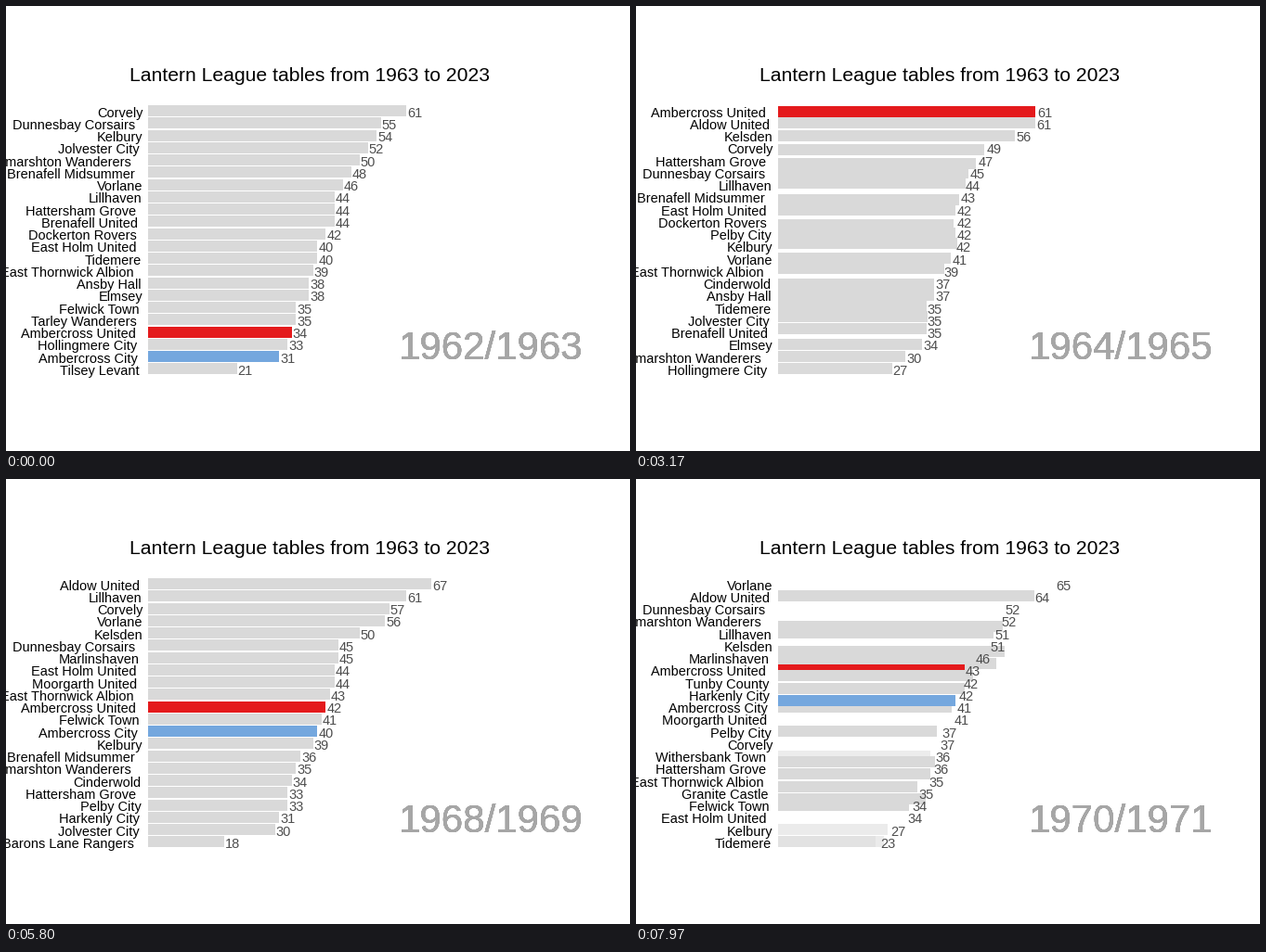
A matplotlib script that plays this animation: 672x480 px, repeating every 8000 ms.

```python
import math

import matplotlib.pyplot as plt
from matplotlib.animation import FuncAnimation
from matplotlib.patches import Rectangle

W, H, DPI = 672, 480, 96
FRAMES, FRAME_MS = 400, 20     # one loop is 8000 ms
TICK_MS = 100 / 3              # the chart itself advances 30 times a second
HOLD, MOVE = 25, 10            # ticks at rest, ticks in motion
LEFT, UNIT = 153, 4.557        # bar origin and pixels per point
TOP, PITCH, BAR_H = 113.05, 13.25, 11.92
ROWS = 22
POOL = 28

GREY, RED, BLUE = "#d9d9d9", "#e41a1c", "#74a7de"
COLORS = {"AMU": RED, "AMC": BLUE}

TEAMS = {
    "ALD": "Aldow United",
    "AMC": "Ambercross City",
    "AMU": "Ambercross United",
    "ANS": "Ansby Hall",
    "BAR": "Barons Lane Rangers",
    "BRE": "Brenafell United",
    "CIN": "Cinderwold",
    "COR": "Corvely",
    "DOC": "Dockerton Rovers",
    "DUN": "Dunnesbay Corsairs",
    "EHO": "East Holm United",
    "ELM": "Elmsey",
    "ETH": "East Thornwick Albion",
    "FEL": "Felwick Town",
    "GRA": "Granite Castle",
    "HAR": "Harkenly City",
    "HAT": "Hattersham Grove",
    "HOL": "Hollingmere City",
    "JOL": "Jolvester City",
    "KEL": "Kelbury",
    "KSD": "Kelsden",
    "LIL": "Lillhaven",
    "MAR": "Marlinshaven",
    "MID": "Brenafell Midsummer",
    "MOO": "Moorgarth United",
    "PEL": "Pelby City",
    "TAR": "Tarley Wanderers",
    "THI": "Thistlemarshton Wanderers",
    "TID": "Tidemere",
    "TIL": "Tilsey Levant",
    "TUN": "Tunby County",
    "VOR": "Vorlane",
    "WIN": "Wintersdown Town",
    "WIT": "Withersbank Town",
}

# Final tables, best team first: team code followed by points.
TABLES = {
    "1962/1963": "COR61 DUN55 KEL54 JOL52 THI50 MID48 VOR46 LIL44 HAT44 BRE44 DOC42 "
                 "EHO40 TID40 ETH39 ANS38 ELM38 FEL35 TAR35 AMU34 HOL33 AMC31 TIL21",
    "1963/1964": "LIL57 AMU53 COR52 DUN51 KSD50 MID49 DOC46 VOR45 KEL44 ETH43 JOL43 "
                 "BRE43 HAT41 EHO40 ELM39 THI39 PEL38 TID35 ANS34 HOL29 TAR28 FEL25",
    "1964/1965": "AMU61 ALD61 KSD56 COR49 HAT47 DUN45 LIL44 MID43 EHO42 DOC42 PEL42 "
                 "KEL42 VOR41 ETH39 CIN37 ANS37 TID35 JOL35 BRE35 ELM34 THI30 HOL27",
    "1965/1966": "LIL61 ALD55 KEL55 AMU51 KSD51 ETH50 JOL49 DUN44 BRE43 PEL42 COR41 "
                 "EHO39 TID37 VOR37 MOO37 ANS36 MID36 HAT36 CIN36 ELM35 WIN33 DOC20",
    "1967/1968": "AMC58 AMU56 LIL55 ALD53 COR52 KSD48 DUN47 ETH46 VOR44 MOO41 HAT39 "
                 "EHO38 JOL38 KEL38 CIN37 MAR37 THI36 PEL35 MID34 HAR33 BRE32 ELM27",
    "1968/1969": "ALD67 LIL61 COR57 VOR56 KSD50 DUN45 MAR45 EHO44 MOO44 ETH43 AMU42 "
                 "FEL41 AMC40 KEL39 MID36 THI35 CIN34 HAT33 PEL33 HAR31 JOL30 BAR18",
    "1969/1970": "COR66 ALD57 KSD55 TUN53 LIL51 HAR49 MOO47 AMU45 PEL45 AMC43 DUN43 "
                 "VOR42 THI40 KEL39 HAT38 ETH37 EHO36 FEL31 MAR29 GRA27 CIN26 MID25",
    "1970/1971": "VOR65 ALD64 DUN52 THI52 LIL51 KSD51 MAR46 AMU43 TUN42 HAR42 AMC41 "
                 "MOO41 PEL37 COR37 WIT36 HAT36 ETH35 GRA35 FEL34 EHO34 KEL27 TID23",
}


def parse(line):
    """Map each team code to (row, points), in table order."""
    return {s[:3]: (row, int(s[3:])) for row, s in enumerate(line.split())}


YEARS = list(TABLES)
SEASONS = [parse(line) for line in TABLES.values()]


def lerp(a, b, t):
    return a + (b - a) * t


def ease(t):
    return (1 - math.cos(math.pi * t)) / 2


def row_y(row):
    return TOP + PITCH * row


plt.rcParams["font.family"] = "Liberation Sans"
fig = plt.figure(figsize=(W / DPI, H / DPI), dpi=DPI, facecolor="white")
ax = fig.add_axes([0, 0, 1, 1])
ax.set_xlim(0, W)
ax.set_ylim(H, 0)
ax.axis("off")


def put(x, y, px, text="", **style):
    return ax.text(x, y, text, fontsize=px * 72 / DPI, va="baseline", **style)


put(521, 81, 21.15, "Lantern League tables from 1963 to 2023", ha="right")
bars = [ax.add_patch(Rectangle((LEFT, 0), 0, BAR_H, lw=0)) for _ in range(POOL)]
names = [put(LEFT, row_y(r) + 6.5, 14.5, ha="right") for r in range(ROWS)]
values = [put(LEFT, row_y(r) + 6.5, 14.5, color="#4d4d4d") for r in range(ROWS)]
# Stacked copies give the year its hard, heavy edges.
years = [put(422.5, 381, 42, color="#a6a6a6") for _ in range(8)]


def measure(text):
    probe = put(0, 0, 14.5, text)
    width = probe.get_window_extent(fig.canvas.get_renderer()).width
    probe.remove()
    return width


# Long names sit further from the bars.
NAME_X = {code: LEFT - 0.7 - 0.1 * measure(name) for code, name in TEAMS.items()}


def bar_states(old, new, t):
    """Yield (code, row, points, alpha) in drawing order."""
    for code, (row, pts) in old.items():
        if code in new:
            yield code, lerp(row, new[code][0], t), lerp(pts, new[code][1], t), 1
        else:
            yield code, row, pts, 1 - t
    for code, (row, pts) in new.items():
        if code not in old:
            yield code, row, pts, t


def draw(frame):
    # Ticks do not line up with frames, so look a little ahead.
    tick = int((frame + 0.75) * FRAME_MS / TICK_MS)
    season, step = divmod(tick, HOLD + MOVE)
    raw = max(0, step - HOLD + 1) / MOVE
    t = ease(raw)
    old = SEASONS[season]
    new = SEASONS[min(season + 1, len(SEASONS) - 1)]

    states = list(bar_states(old, new, t))
    for i, bar in enumerate(bars):
        bar.set_visible(i < len(states))
        if i < len(states):
            code, row, pts, alpha = states[i]
            bar.set_y(row_y(row) - BAR_H / 2)
            bar.set_width(UNIT * pts)
            bar.set_facecolor(COLORS.get(code, GREY))
            bar.set_alpha(alpha)

    # Text stays in its row and switches halfway.
    late = raw >= 0.5
    shown = new if late else old
    pairs = zip(old.values(), new.values())
    for r, (code, ((_, a), (_, b))) in enumerate(zip(shown, pairs)):
        names[r].set_text(TEAMS[code])
        names[r].set_x(NAME_X[code])
        values[r].set_text(str(shown[code][1]))
        values[r].set_x(LEFT + UNIT * lerp(a, b, t) + 0.9)
    for label in years:
        label.set_text(YEARS[season + late])
    return bars + names + values + years


anim = FuncAnimation(fig, draw, frames=FRAMES, interval=FRAME_MS,
                     repeat=True, repeat_delay=0, blit=False)
plt.show()
```
